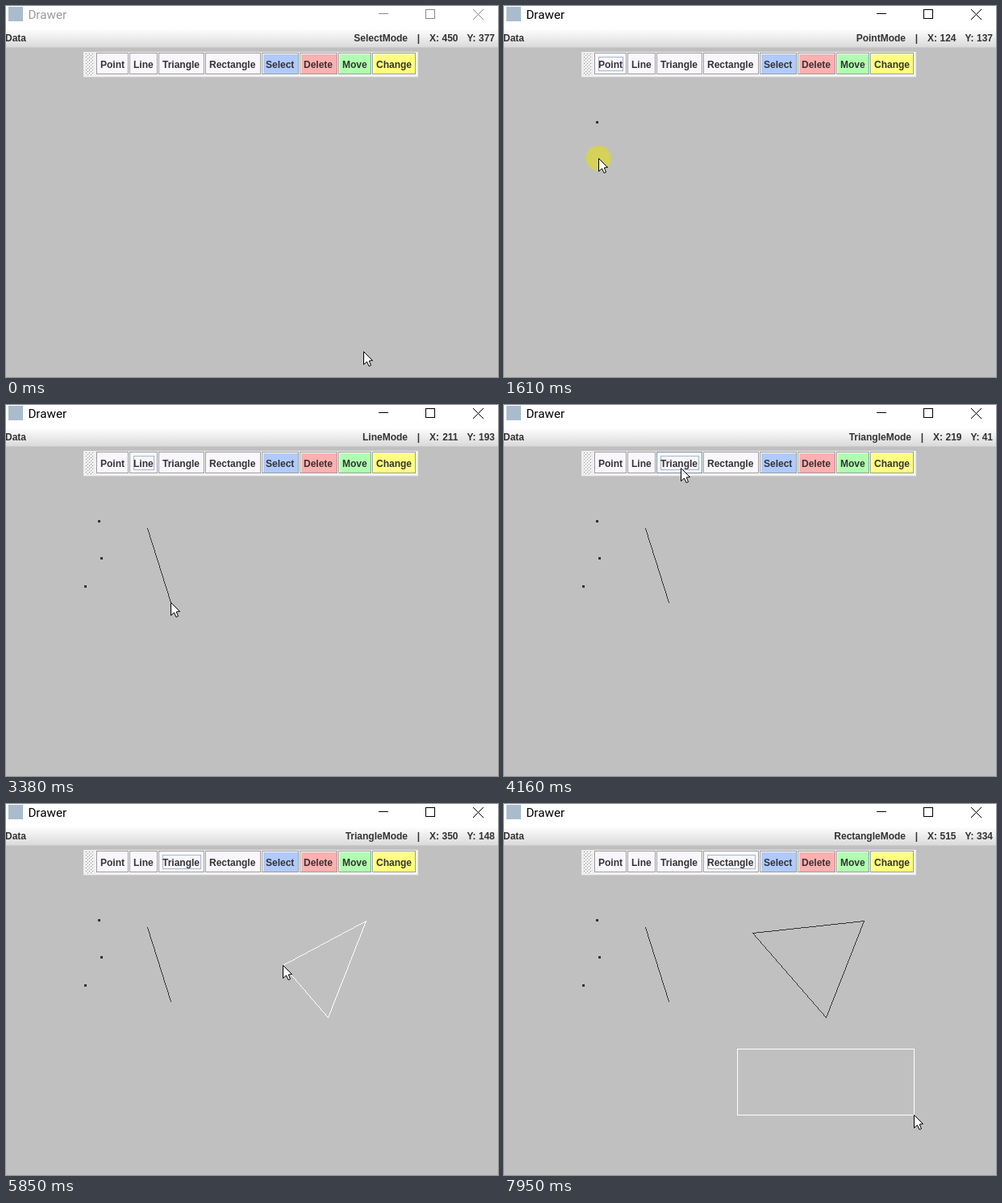
Recreate the animation shown at these times as an HTML page with a canvas. Size 610x461 px, loop 8 s.

```html
<!DOCTYPE html>
<html lang="en">
<head>
<meta charset="utf-8">
<title>Drawer</title>
<style>
html, body { margin: 0; width: 610px; height: 461px; overflow: hidden; background: #c0c0c0; }
canvas { display: block; }
</style>
</head>
<body>
<canvas id="stage" width="610" height="461"></canvas>
<script>
const ctx = document.getElementById("stage").getContext("2d", { alpha: false });
const LOOP = 8000;
const PAUSE = 75;       // rest before a click, and length of a click
const TRAVEL = 390;     // longest cursor move
const CANVAS_TOP = 91;
const UI_FONT = 'bold 12px "Liberation Sans", Arial, sans-serif';
const INK = "#333";

const BUTTONS = [
  { label: "Point", w: 41, corners: 1 },
  { label: "Line", w: 36, corners: 2 },
  { label: "Triangle", w: 58, corners: 3 },
  { label: "Rectangle", w: 70, corners: 2 },
  { label: "Select", w: 47, fill: "#b0caff" },
  { label: "Delete", w: 48, fill: "#ffb0b0" },
  { label: "Move", w: 42, fill: "#b0ffb0" },
  { label: "Change", w: 55, fill: "#ffff80" }
];
BUTTONS.reduce((x, b) => (b.x = x) + b.w, 112);
const [POINT, LINE, TRIANGLE, RECTANGLE] = BUTTONS;

// What the user does: rest, click on the canvas, or pick a tool.
// "via" is where the cursor leaves the canvas on its way to the toolbar.
const rest = (at, x, y, via) => ({ at, x, y, via, rest: true });
const click = (at, x, y) => ({ at, x, y });
const pick = (at, tool, x, y, via, hold) => ({ at, tool, x, y, via, hold });

const STEPS = [
  rest(0, 443, 429),
  rest(525, 131, 74, [165, 96]),
  pick(680, POINT, 131, 74, [165, 96]),
  click(985, 114, 143),
  click(1540, 117, 189),
  click(1846, 97, 224),
  pick(2455, LINE, 178, 76, [202, 93]),
  click(2870, 175, 153),
  click(3222, 204, 245),
  pick(4030, TRIANGLE, 216, 73, [212, 93]),
  rest(4545, 263, 149),
  click(5000, 446, 145),
  click(5546, 399, 265),
  click(6090, 308, 160),
  pick(6860, RECTANGLE, 286, 70, [307, 91], 160),
  click(7405, 289, 304),
  click(8025, 508, 386)
];
for (const s of STEPS) s.end = s.at + (s.hold || PAUSE);

const mix = (a, b, k) => Math.round(a + (b - a) * k);
const ease = k => k * k * (3 - 2 * k);

function mouseAt(t) {
  const i = Math.max(1, STEPS.findIndex(s => t < s.end));
  const from = STEPS[i - 1], to = STEPS[i];
  const arrive = to.at - PAUSE;
  const leave = Math.max(from.end, arrive - TRAVEL);
  let k = ease(Math.min(1, Math.max(0, (t - leave) / (arrive - leave))));
  let a = [from.x, from.y], b = [to.x, to.y];
  if (to.via) {
    const bend = 0.7;
    if (k < bend) { b = to.via; k /= bend; }
    else { a = to.via; k = (k - bend) / (1 - bend); }
  }
  const pos = [mix(a[0], b[0], k), mix(a[1], b[1], k)];
  const [x, y] = pos[1] < CANVAS_TOP ? to.via || from.via : pos;
  return { pos, readout: [x + 7, y - 52], down: t >= to.at && !to.rest };
}

// Replays all clicks up to the given time.
function sceneAt(t) {
  const scene = { mode: "Select", focus: null, figures: [] };
  let tool, figure;
  for (const s of STEPS) {
    if (s.tool && t >= s.at) scene.focus = s.tool;
    if (s.rest || t < s.end) continue;
    if (s.tool) {
      tool = s.tool;
      scene.mode = tool.label;
    } else {
      if (!figure || figure.done) scene.figures.push(figure = { tool, points: [] });
      figure.points.push([s.x, s.y]);
      figure.done = figure.points.length === tool.corners;
    }
  }
  return scene;
}

function box(x, y, w, h, color) {
  ctx.fillStyle = color;
  ctx.fillRect(x, y, w, h);
}

function frame(x, y, w, h, color) {
  ctx.strokeStyle = color;
  ctx.lineWidth = 1;
  ctx.strokeRect(x + 0.5, y + 0.5, w - 1, h - 1);
}

function text(str, x, y, align = "left", font = UI_FONT, color = INK) {
  ctx.font = font;
  ctx.textAlign = align;
  ctx.fillStyle = color;
  ctx.fillText(str, x, y);
}

// Hard-edged line, one pixel wide.
function line([x0, y0], [x1, y1], color) {
  const n = Math.max(Math.abs(x1 - x0), Math.abs(y1 - y0), 1);
  for (let i = 0; i <= n; i++) box(mix(x0, x1, i / n), mix(y0, y1, i / n), 1, 1, color);
}

function drawTitleBar(active) {
  box(0, 0, 610, 28, "#fff");
  box(3, 1, 18, 18, "#a9bccb");
  text("Drawer", 27.4, 16, "left", '15.2px Roboto, "Open Sans", sans-serif', active ? "#000" : "#999");
  const color = active ? "#000" : "#888";
  box(462, 9, 12, 1, color);
  frame(520, 4, 12, 12, color);
  line([579, 4], [591, 16], color);
  line([591, 4], [579, 16], color);
}

function drawMenuBar(mode, [x, y]) {
  const shade = ctx.createLinearGradient(0, 28, 0, 51);
  shade.addColorStop(0, "#fff");
  shade.addColorStop(1, "#dadada");
  box(0, 28, 610, 23, shade);
  box(0, 51, 610, 1, "#ccc");
  text("Data", -1, 44);
  const yLeft = 593 - 7 * String(y).length;
  const xLeft = yLeft - 26 - 7 * String(x).length;
  text("Y:", yLeft - 0.5, 44);
  text(y, 606, 44, "right");
  text("X:", xLeft, 44);
  text(x, yLeft - 11.5, 44, "right");
  text("|", xLeft - 13.5, 44, "center");
  text(mode + "Mode", xLeft - 27, 44, "right");
}

function drawButton(b, focused, hover, down) {
  const pressed = hover && down;
  box(b.x, 58, b.w, 28, "#fff");
  const inset = hover ? 1 : 2;
  box(b.x + inset, 58 + inset, b.w - 2 - inset, 26 - inset, pressed ? "#b8cfe5" : b.fill || "#f9f6ff");
  frame(b.x, 58, b.w - 1, 27, hover ? "#7a8a99" : "#999");
  if (pressed) box(b.x, 59, b.w - 1, 1, "#7a8a99");
  if (focused) frame(b.x + 5, 63, b.w - 10, 18, "#a3b8cc");
  text(b.label, b.x + 5, 77);
}

function drawToolbar(focus, { pos: [x, y], down }) {
  box(96, 57, 415, 32, "#eee");
  box(96, 88, 415, 1, "#ccc");
  for (let dy = 59; dy < 86; dy += 2) {
    for (let dx = 99 + (dy - 59) % 4; dx < 109; dx += 4) {
      box(dx, dy, 1, 1, "#8f8f8f");
      box(dx + 1, dy + 1, 1, 1, "#fff");
    }
  }
  for (const b of BUTTONS) {
    const hover = x >= b.x && x < b.x + b.w && y >= 58 && y < 86;
    drawButton(b, b === focus, hover, down);
  }
}

function drawFigure({ tool, points, done }, cursor) {
  const color = done ? INK : "#fff";
  const p = done ? points : [...points, cursor];
  if (tool === POINT) {
    box(...p[0], 3, 3, color);
  } else if (tool === RECTANGLE) {
    const [[x0, y0], [x1, y1]] = p;
    frame(x0, y0, x1 - x0 + 1, y1 - y0 + 1, color);
  } else {
    p.forEach((q, i) => line(q, p[(i + 1) % p.length], color));
  }
}

function drawCursor({ pos: [x, y], down }) {
  if (down) {
    ctx.fillStyle = "rgba(224, 220, 36, 0.65)";
    ctx.beginPath();
    ctx.arc(x, y, 15.5, 0, Math.PI * 2);
    ctx.fill();
  }
  const outline = [[0, 0], [0, 16], [4, 12.5], [6.5, 18], [9, 17], [6.7, 11.5], [11, 11]];
  ctx.beginPath();
  for (const [dx, dy] of outline) ctx.lineTo(x + dx + 0.5, y + dy + 0.5);
  ctx.closePath();
  ctx.fillStyle = "#fff";
  ctx.fill();
  ctx.strokeStyle = "#000";
  ctx.lineWidth = 1;
  ctx.stroke();
}

function draw(t) {
  const mouse = mouseAt(t);
  const scene = sceneAt(t);
  box(0, 0, 610, 461, "#c0c0c0");
  drawTitleBar(scene.focus);
  drawMenuBar(scene.mode, mouse.readout);
  drawToolbar(scene.focus, mouse);
  for (const figure of scene.figures) drawFigure(figure, mouse.pos);
  drawCursor(mouse);
}

const origin = performance.now();
function tick() {
  draw((performance.now() - origin) % LOOP);
  requestAnimationFrame(tick);
}
tick();
</script>
</body>
</html>
```
